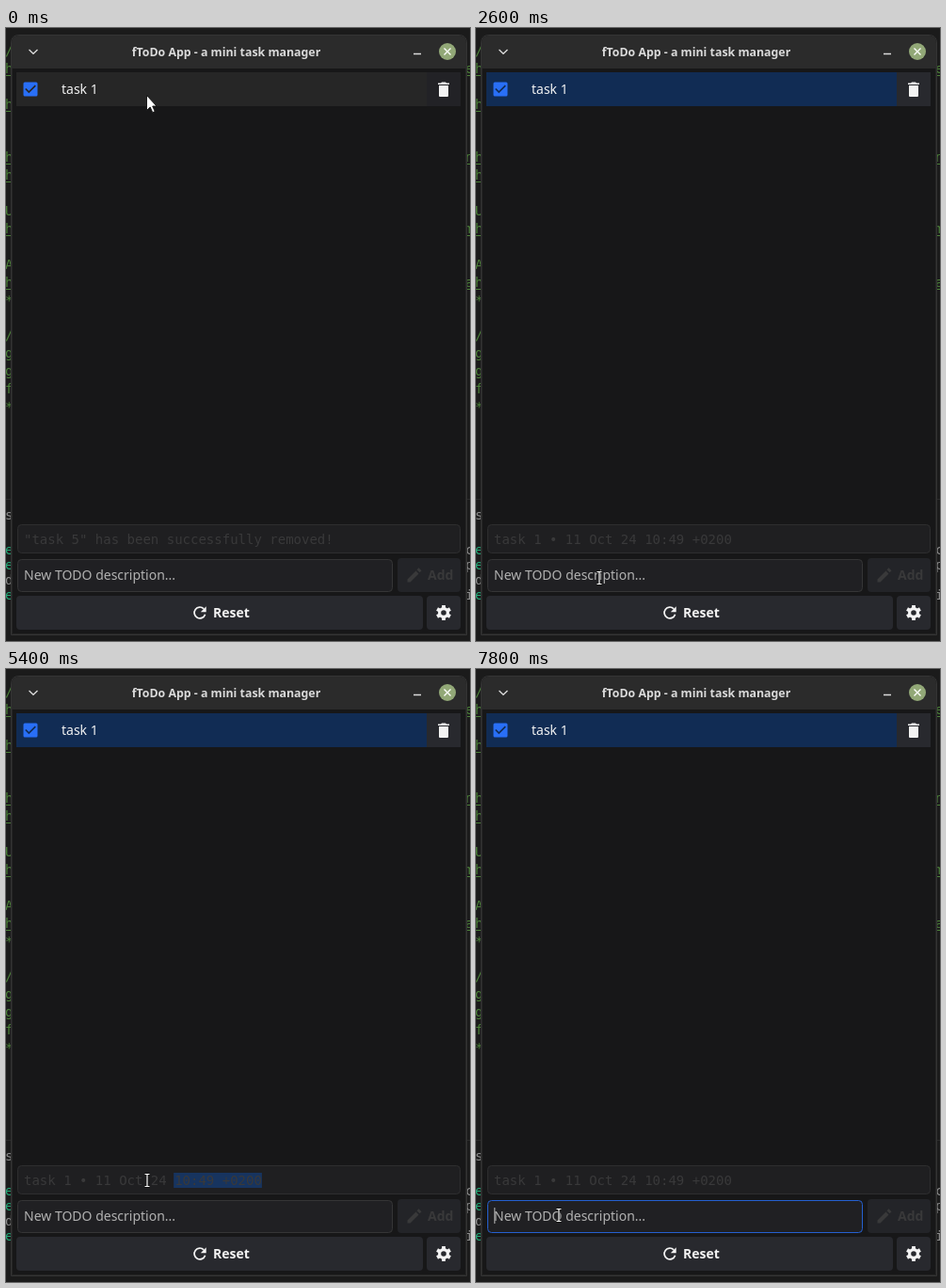
Animation, 493 px wide and 651 px high, one loop 8 s. Source, as an HTML page:

```html
<!DOCTYPE html>
<html lang="en">
<head>
<meta charset="utf-8">
<title>Task manager</title>
<style>
  html, body { margin: 0; width: 100%; height: 100%; overflow: hidden; background: #1b1b1b; }
  svg { display: block; width: 493px; height: 651px; }
  text { font: 14px "Noto Sans", sans-serif; fill: #f3f3f3; white-space: pre; }
  .bold { font-weight: 700; }
  .title { font-size: 12.35px; font-weight: 600; fill: #dadada; text-anchor: middle; }
  .mono, #code text { font-family: "DejaVu Sans Mono", monospace; }
  .mono, .disabled { fill: #39393a; }
  .icon { fill: #f3f3f3; }
  .button { fill: #28292e; }
  .line { fill: none; stroke: #dadada; stroke-width: 1.3; }
</style>
</head>
<body>
<svg viewBox="0 0 493 651">
  <rect width="493" height="651" fill="#1b1b1b"/>
  <path d="M0 500.5H493" stroke="#2b2b2b"/>
  <g id="code"></g>

  <path d="M5.5 644.5V16Q5.5 7.5 14 7.5H481Q489.5 7.5 489.5 16V644.5Z" fill="#171718" stroke="#343434"/>
  <path d="M6 43V16Q6 8 14 8H481Q489 8 489 16V43Z" fill="#2b2b2b"/>
  <path d="M6.5 43V643.5H488.5V43" fill="none" stroke="#262626"/>
  <path class="line" d="M24.5 23L29 27.3 33.5 23M433 27.5H441"/>
  <text class="title" x="234" y="30">fToDo App - a mini task manager</text>
  <circle cx="469" cy="25" r="9" fill="#92a877"/>
  <path d="M465.5 21.5l7 7m0-7l-7 7" stroke="#fff" stroke-width="1.3"/>

  <rect id="row" x="11" y="47" width="436" height="36"/>
  <rect id="remove" x="447" y="47" width="36" height="36"/>
  <circle id="halo" cx="26" cy="65" r="14" fill="#fff" fill-opacity=".1"/>
  <rect x="18.5" y="57.5" width="15" height="15" rx="1.5" fill="#296ff6"/>
  <path id="check" d="M20.8 64.5l3.5 3.6 7-7" fill="none" stroke-width="1.7"/>
  <text x="59" y="70">task 1</text>
  <path class="icon" d="M459 58.4h3l1-1h4l1 1h3v1.6h-12zM460 61h10v11q0 1-1 1h-8q-1 0-1-1z"/>

  <rect x="12.5" y="527.5" width="470" height="30" rx="4" fill="#1f1f21" stroke="#2e2e2f"/>
  <rect id="selection" y="535" height="16" fill="#17345f"/>
  <text id="status" class="mono" x="19" y="548"></text>

  <rect id="field" x="12.5" y="564.5" width="398" height="34" rx="4" fill="#202023"/>
  <text x="19" y="586" style="fill:#b2b2b2">New TODO description...</text>
  <rect id="caret" x="19" y="572" width="1.5" height="17" fill="#b2b2b2"/>

  <rect x="416" y="563" width="67" height="36" rx="4" fill="#232428"/>
  <path class="disabled" d="M426.5 588.5v-3l9-9 3 3-9 9zM436.5 575.3l2-2 3 3-2 2z"/>
  <text class="bold" x="448" y="586" style="fill:#39393a">Add</text>

  <rect class="button" x="11" y="603" width="432" height="36" rx="4"/>
  <path d="M210.2 616.8A5.9 5.9 0 1 0 211.6 622.7" fill="none" stroke="#f3f3f3" stroke-width="1.7"/>
  <path class="icon" d="M212.7 614.3v5.9h-5.9z"/>
  <text class="bold" x="220" y="626">Reset</text>
  <rect class="button" x="447" y="603" width="36" height="36" rx="4"/>
  <g id="gear" transform="translate(465 621)" fill="none" stroke="#f3f3f3">
    <circle r="4.4" stroke-width="3.2"/>
  </g>

  <path id="arrow" d="M.5 .5V16.5L4.2 13 6.8 18.7 9.2 17.6 6.7 12H11Z" fill="#fff" stroke="#111" stroke-width=".9"/>
  <g id="beam" fill="none">
    <path d="M-3-6.5H3M0-6.5V6.5M-3 6.5H3" stroke="#111" stroke-width="2.6"/>
    <path d="M-2.5-6.5H2.5M0-6.5V6.5M-2.5 6.5H2.5" stroke="#fff" stroke-width="1.2"/>
  </g>
</svg>
<script>
const $ = id => document.getElementById(id);
const show = (id, visible) => $(id).style.display = visible ? "" : "none";
const set = (id, name, value) => $(id).setAttribute(name, value);

const LOOP = 8000, STEP = 100;
const TEXT_X = 19, CHAR_W = 8.43, CHARS = 30;
const LEFT = -1, RIGHT = 488;
const GREEN = "#4b8038", MINT = "#23a877", GREY = "#8c8c8c";

// Slivers of the editor and terminal beside the window, one character per line
function addCode(chars, x, top, pitch, color, linked = "") {
  [...chars].forEach((char, i) => {
    const y = top + i * pitch;
    $("code").innerHTML += `<text x="${x}" y="${y}" style="fill:${color}">${char}</text>`;
    if (linked.includes(char)) {
      $("code").innerHTML += `<path d="M${x} ${Math.round(y) + 2.5}h8" stroke="${color}"/>`;
    }
  });
}
addCode("/h h  hh Uh Ah* /ggf*", LEFT, 29, 18.9, GREEN, "h");
addCode(" e    n   m  a", RIGHT, 29, 18.9, GREEN, "enma");
addCode("s", LEFT, 522, 16, GREY);
addCode("ee e", LEFT, 559, 16, MINT);
addCode("  d", LEFT, 559, 16, GREY);
addCode("cp i", RIGHT, 559, 16, GREY);

for (let angle = 30; angle < 360; angle += 60) {
  $("gear").innerHTML += `<path d="M5 0H8" stroke-width="3.8" transform="rotate(${angle})"/>`;
}

// Pointer moves; bowX and bowY bend the straight way at its middle
const moves = [
  { from: 500, to: 500, x: 85, y: 63 },
  { from: 700, to: 1200, x: 26, y: 63, bowY: 24 },
  { from: 1500, to: 2300, x: 130, y: 581 },
  { from: 2600, to: 3400, x: 18, y: 549, bowX: 33, bowY: 16 },
  { from: 3700, to: 3900, x: 279, y: 546 },
  { from: 4400, to: 4500, x: 281, y: 530 },
  { from: 4700, to: 5500, x: 114, y: 545, bowX: 44 },
  { from: 5600, to: 5800, x: 27, y: 539 },
  { from: 6100, to: 6500, x: 92, y: 443, bowX: -40 },
  { from: 6700, to: 6700, x: 97, y: 534 },
  { from: 6800, to: 7200, x: 78, y: 589 },
  { from: 7600, to: 7800, x: 88, y: 580 }
];

function pointerAt(time) {
  let x = 149, y = 71;
  for (const { from, to, x: endX, y: endY, bowX = 0, bowY = 0 } of moves) {
    if (time < from) break;
    const k = Math.min(1, (time - from + STEP) / (to - from + STEP));
    const bend = 4 * k * (1 - k);
    x += (endX - x) * k + bowX * bend;
    y += (endY - y) * k + bowY * bend;
  }
  return [x, y];
}

function draw() {
  const time = Math.floor(performance.now() % LOOP / STEP) * STEP;
  const [x, y] = pointerAt(time);

  const selected = time >= 100;
  const rowColor = selected ? "#112c54" : "#262626";
  set("row", "fill", rowColor);
  set("check", "stroke", rowColor);
  set("remove", "fill", selected ? "#28292e" : "#222226");
  show("halo", x < 42 && y > 47 && y < 83);
  $("status").textContent = selected
    ? "task 1 • 11 Oct 24 10:49 +0200"
    : '"task 5" has been successfully removed!';

  // The selection trails the dragged pointer by one step
  const dragging = time >= 4700 && time < 7400;
  show("selection", dragging);
  if (dragging) {
    const dragX = time >= 6100 ? 0 : pointerAt(time - STEP)[0];
    const first = Math.max(0, Math.min(CHARS, Math.round((dragX - TEXT_X) / CHAR_W)));
    const left = TEXT_X - 1 + first * CHAR_W;
    set("selection", "x", left);
    set("selection", "width", TEXT_X + CHARS * CHAR_W - left);
  }

  set("field", "stroke", time >= 7400 ? "#2560d0" : "#353536");
  set("caret", "opacity", Math.max(0, Math.min(.7, (time - 7500) / 430)));

  const inField = y > 564 && y < 599;
  const inStatus = y > 527 && y < 558 && time < 6200;
  const beam = inField || inStatus;
  show("beam", beam);
  show("arrow", !beam);
  set(beam ? "beam" : "arrow", "transform", `translate(${Math.round(x)} ${Math.round(y)})`);
  requestAnimationFrame(draw);
}
draw();
</script>
</body>
</html>
```
